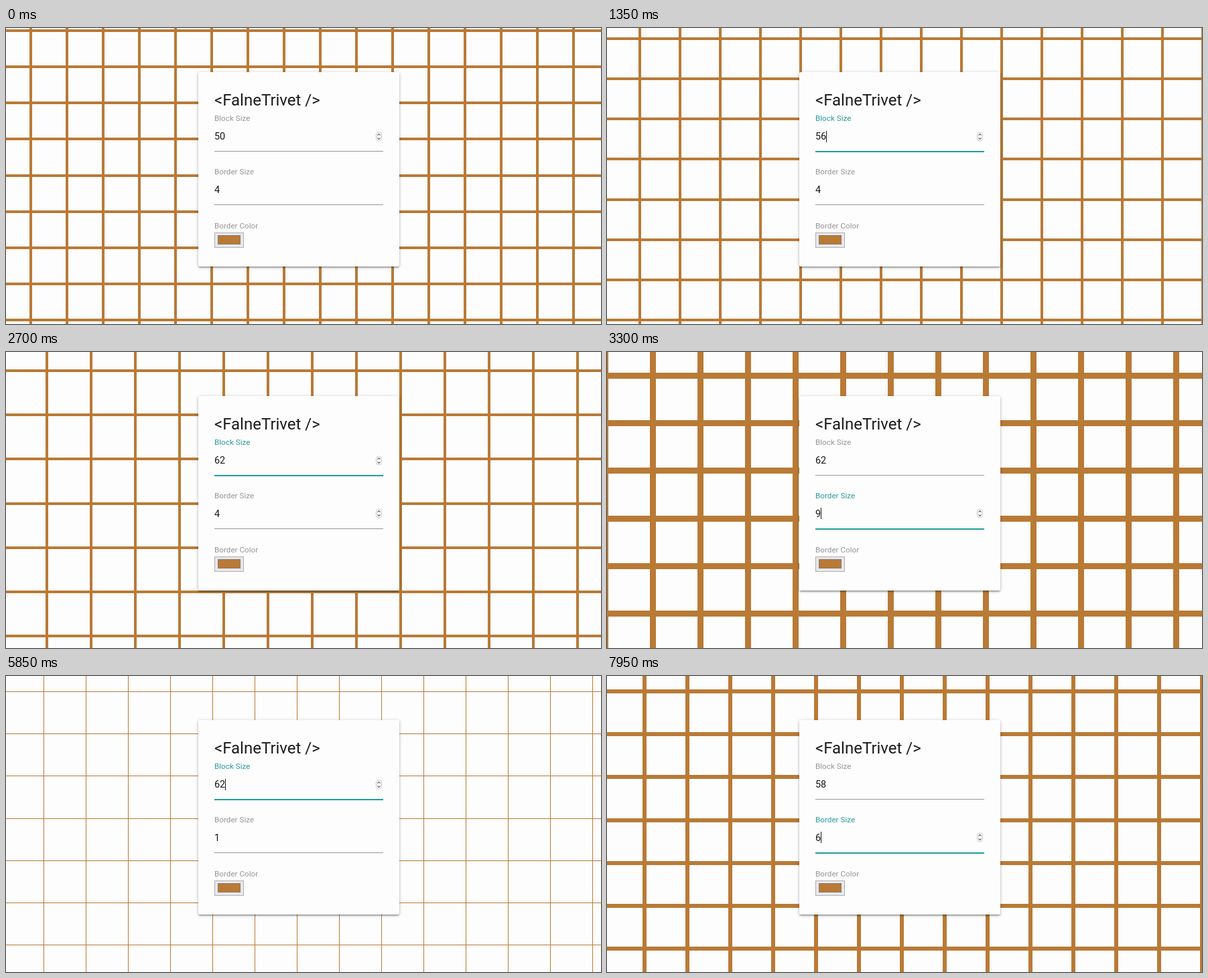
Animation, 888 px wide and 443 px high, one loop 8000 ms. Source, as an HTML page:

```html
<!DOCTYPE html>
<html lang="en">
<head>
<meta charset="utf-8">
<title>Grid settings</title>
<style>
  html, body { margin: 0; width: 100%; height: 100%; overflow: hidden; background: #fdfdfd; }
  #stage { position: absolute; left: 0; top: 0; width: 888px; height: 443px; overflow: hidden; }
  svg { position: absolute; left: 0; top: 0; font-family: Roboto, sans-serif; }
  #card {
    position: absolute; left: 287px; top: 66px; width: 300px; height: 291px;
    background: #fdfdfd; border-radius: 2px;
    box-shadow: 0 1px 5px rgba(0,0,0,.24), 0 2px 2px rgba(0,0,0,.18), 0 3px 1px -2px rgba(0,0,0,.16);
  }
  .title { font-size: 24px; fill: #1c1c1c; }
  .label { font-size: 11.7px; fill: #969696; }
  .value { font-size: 14.4px; fill: #161616; }
  .rule { fill: #999; }
  .on .label { fill: #2a9c9c; }
  .on .rule { fill: #1f9c9c; }
  .wire { fill: none; stroke-width: 1.1; }
</style>
</head>
<body>
<div id="stage">
  <svg width="888" height="443"><path id="grid" fill="#b97a36" shape-rendering="crispEdges"/></svg>
  <div id="card"></div>
  <svg width="888" height="443">
    <defs>
      <g id="spinner">
        <rect x="-4" y="-6.5" width="8" height="13" rx="3.5" fill="#fafafa" stroke="#ccc"/>
        <path class="wire" d="M-2 -1.8L0 -4L2 -1.8M-2 1.8L0 4L2 1.8" stroke="#555"/>
      </g>
      <g id="pressed">
        <path d="M-4.5 0h9v3a4 4 0 0 1 -4 4h-1a4 4 0 0 1 -4 -4z" fill="#1f5fc8"/>
        <path class="wire" d="M-2 1.8L0 4L2 1.8" stroke="#fff"/>
      </g>
    </defs>
    <text class="title" x="311" y="116">&lt;FalneTrivet /&gt;</text>
    <g id="block">
      <text class="label" x="311" y="139">Block Size</text>
      <text class="value" x="311" y="167"></text>
      <rect class="rule" x="311" y="184" width="252" height="1"/>
      <rect class="caret" y="154" width="1" height="17" fill="#161616"/>
      <use class="spin" href="#spinner" x="556.5" y="162.5"/>
      <use class="press" href="#pressed" x="556.5" y="162.5"/>
    </g>
    <g id="border">
      <text class="label" x="311" y="218.5">Border Size</text>
      <text class="value" x="311" y="246.5"></text>
      <rect class="rule" x="311" y="264" width="252" height="1"/>
      <rect class="caret" y="233" width="1" height="17" fill="#161616"/>
      <use class="spin" href="#spinner" x="556.5" y="241.5"/>
      <use class="press" href="#pressed" x="556.5" y="241.5"/>
    </g>
    <text class="label" x="311" y="300">Border Color</text>
    <rect x="311.5" y="306.5" width="43" height="22" fill="#e8e8ea" stroke="#b0b0b4"/>
    <rect x="316.5" y="310.5" width="33" height="13" fill="#b97a36" stroke="#8a7a70"/>
  </svg>
</div>
<script>
  const LOOP = 8000, TICK = 150, BLINK = 500, LEAD = 250;
  const W = 888, H = 443, STRETCH = 1.0025;

  // Each act clicks one field's spinner steadily, changing its value by `by`.
  const acts = [
    { id: 'block', start: 250, end: 2200, by: 12 },
    { id: 'border', start: 2750, end: 3700, by: 9 },
    { id: 'border', start: 4250, end: 5400, by: -12 },
    { id: 'block', start: 5750, end: 6450, by: -4 },
    { id: 'border', start: 6950, end: 7950, by: 5 }
  ];
  const initial = { block: 50, border: 4 };

  const clamp = x => Math.min(1, Math.max(0, x));
  const gained = (act, t) => Math.trunc(act.by * clamp((t - act.start) / (act.end - act.start)));
  const valueOf = (id, t) =>
    acts.filter(a => a.id === id).reduce((sum, a) => sum + gained(a, t), initial[id]);

  function field(id) {
    const root = document.getElementById(id);
    const part = name => root.querySelector('.' + name);
    const show = (name, on) => part(name).setAttribute('visibility', on ? 'visible' : 'hidden');

    return (value, t) => {
      const text = String(value);
      const act = acts.findLast(a => a.start <= t);
      const focused = act?.id === id;
      const hovered = acts.findLast(a => a.start - LEAD <= t).id === id;
      const idle = focused ? Math.max(0, t - act.end) : 0;

      root.classList.toggle('on', focused);
      part('value').textContent = text;
      part('rule').setAttribute('height', focused ? 2 : 1);
      part('caret').setAttribute('x', Math.round(311 + text.length * 8.1));
      show('caret', focused && Math.floor(idle / BLINK) % 2 === 0);
      show('spin', focused || hovered);
      show('press', focused && t < act.end && gained(act, t) < 0);
    };
  }

  const drawBlock = field('block'), drawBorder = field('border');
  const grid = document.getElementById('grid');

  // Cells start off stage at (-69, -102); each has its line on the right and bottom.
  function gridPath(size, line) {
    let d = '';
    for (let x = size - 69; x < W; x += size + line) d += `M${x} 0h${line}v${H}h${-line}z`;
    for (let y = size - 102; y < H; y += size + line) {
      d += `M0 ${Math.round(y * STRETCH)}h${W}v${line}h${-W}z`;
    }
    return d;
  }

  function render(time) {
    const t = Math.floor((time % LOOP) / TICK) * TICK;
    const block = valueOf('block', t), border = valueOf('border', t);
    grid.setAttribute('d', gridPath(block, border));
    drawBlock(block, t);
    drawBorder(border, t);
  }

  const start = performance.now();
  function loop() {
    render(performance.now() - start);
    requestAnimationFrame(loop);
  }
  loop();
</script>
</body>
</html>
```
